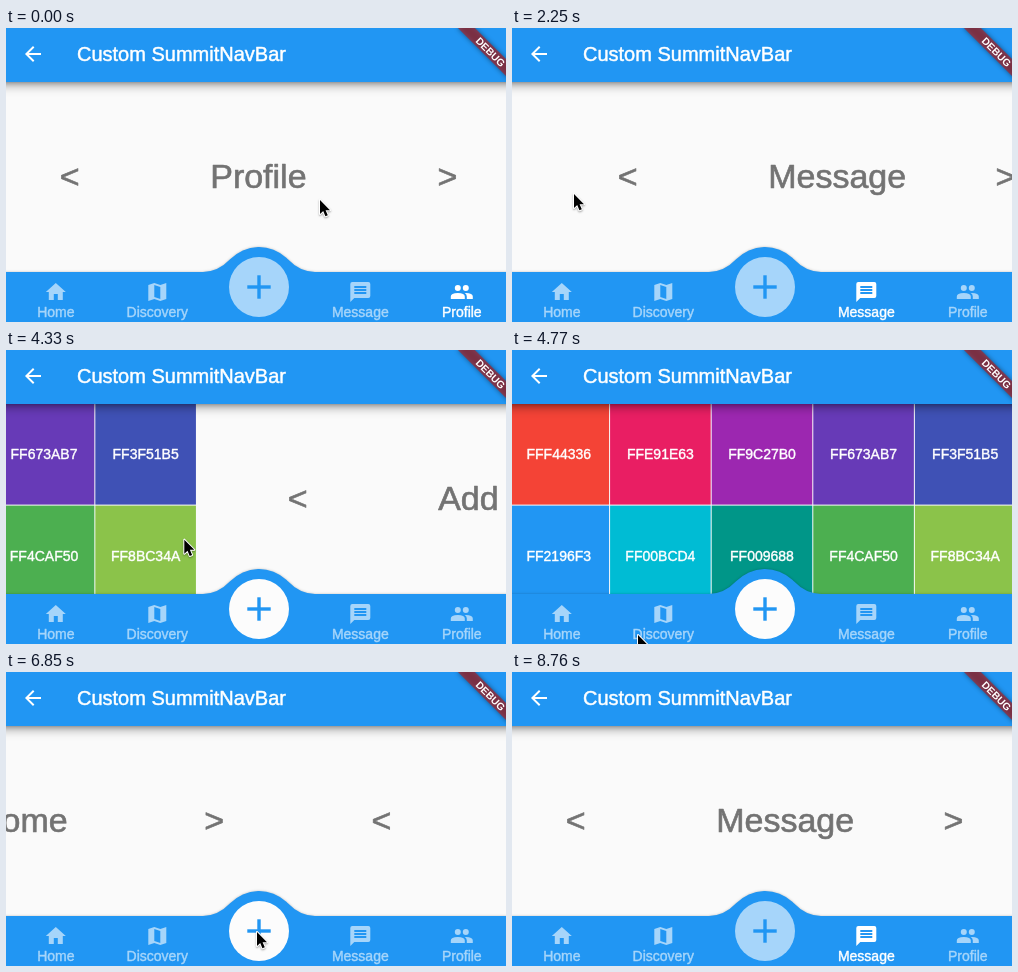
An HTML page with a canvas for the animation above (9.81 s loop, 500 by 294 pixels).

```html
<!DOCTYPE html>
<html lang="en">
<head>
<meta charset="utf-8">
<title>Tab bar demo</title>
<style>
  html, body { margin: 0; width: 100%; height: 100%; overflow: hidden; background: #fafafa; }
  canvas { display: block; width: 100%; height: 100%; }
</style>
</head>
<body>
<canvas id="stage"></canvas>
<script>
const W = 500, H = 294, PAGE = 507, LOOP = 9810;
const TICK = 148, FIRST_TICK = 465;
const BLUE = '#2196f3', PALE = '#a6d5fa', WHITE = '#fff', GRAY = '#737373';
const FONT = '"Liberation Sans", Arial, sans-serif';

const canvas = document.getElementById('stage');
const ctx = canvas.getContext('2d');
const ratio = window.devicePixelRatio || 1;
canvas.width = W * ratio;
canvas.height = H * ratio;

const HOME = 0, DISCOVERY = 1, ADD = 2, MESSAGE = 3, PROFILE = 4;
const NAMES = ['Home', 'Discovery', 'Add', 'Message', 'Profile'];
const SWATCHES = ['F44336', 'E91E63', '9C27B0', '673AB7', '3F51B5',
                  '2196F3', '00BCD4', '009688', '4CAF50', '8BC34A'];

const textLine = y => `M6 ${y}h12v2H6z`;
const head = x => `M${x + 3} 8a3 3 0 1 1-6 0 3 3 0 1 1 6 0z`;
const ICONS = {
  back: 'M20 11H7.8l5.6-5.6L12 4l-8 8 8 8 1.4-1.4L7.8 13H20z',
  [HOME]: 'M10 20v-6h4v6h5v-8h3L12 3 2 12h3v8z',
  [DISCOVERY]: 'M21 3L15 5.1 9 3 3 5v16l6-2.1 6 2.1 6-2zM15 19l-6-2.1V5l6 2.1z',
  [MESSAGE]: 'M4 2h16q2 0 2 2v12q0 2-2 2H6l-4 4V4q0-2 2-2z' + [6, 9, 12].map(textLine).join(''),
  [PROFILE]: [8, 16].map(head).join('') +
    'M8 13q-7 0-7 3.5V19h14v-2.5q0-3.5-7-3.5zM16 13h-1q2 1.2 2 3.5V19h6v-2.5q0-3.5-7-3.5z'
};
for (const key in ICONS) ICONS[key] = new Path2D(ICONS[key]);
const ARROW = new Path2D('M0 0V14L3.2 11 5.4 16.3 7.8 15.3 5.6 10.2H10z');

// Times are in ticks. A swipe drags the page by `held` px, then lets it settle.
const GESTURES = [
  { to: MESSAGE, start: 0, held: 6, release: 3 },
  { to: ADD, start: 10, held: 52, release: 13 },
  { to: DISCOVERY, start: 21, held: 79, release: 25 },
  { to: HOME, start: 35 },
  { to: ADD, start: 43 },
  { to: MESSAGE, start: 47, held: 76, release: 49 }
];
const SETTLE = 5;

// Pointer stops: arrive, leave, x, y.
const STOPS = [
  [-1, -1, 314, 172], [2, 3, 8, 165], [5, 7, 188, 161], [10, 10, 8, 166],
  [12, 13, 62, 166], [19, 21, 107, 172], [23, 25, 188, 172], [29, 29, 126, 285],
  [32, 37, 49, 272], [40, 44, 251, 260], [47, 47, 300, 194], [49, 49, 211, 196],
  [56, 56, 200, 312]
];

function tapShift(age) {
  const u = Math.min(1, 0.235 + age * TICK / 300);
  return PAGE * (1 - (1 - u) ** 2.3);
}

function swipeShift(g, tick) {
  const dragged = g.held * Math.min(1, (tick - g.start) / 2);
  const age = tick - g.release;
  if (age <= 0) return dragged;
  if (age >= SETTLE) return PAGE;
  return PAGE - (PAGE - g.held) * Math.exp(-0.3 * age * age);
}

function viewAt(tick) {
  const index = GESTURES.filter(g => g.start <= tick).length - 1;
  if (index < 0) return { from: PROFILE, to: MESSAGE, shift: 0, selected: PROFILE };
  const g = GESTURES[index];
  const from = index ? GESTURES[index - 1].to : PROFILE;
  const isSwipe = 'held' in g;
  const shift = isSwipe ? swipeShift(g, tick) : tapShift(tick - g.start);
  const selected = isSwipe && shift < PAGE ? from : g.to;
  return { from, to: g.to, shift, selected };
}

function pointerAt(tick) {
  const i = Math.max(0, STOPS.filter(stop => stop[0] <= tick).length - 1);
  const [, leave, x, y] = STOPS[i];
  if (tick <= leave || i === STOPS.length - 1) return [x, y];
  const [arrive, , nextX, nextY] = STOPS[i + 1];
  const u = (tick - leave) / (arrive - leave);
  const e = u * u * (3 - 2 * u);
  return [x + (nextX - x) * e, y + (nextY - y) * e];
}

function text(str, x, y, size, color, align = 'left', weight = '') {
  ctx.font = `${weight} ${size}px ${FONT}`;
  ctx.textAlign = align;
  ctx.fillStyle = ctx.strokeStyle = color;
  ctx.fillText(str, x, y);
  // A hairline gives the slightly heavier strokes of smoothed text.
  ctx.lineWidth = 0.25 + size * 0.012;
  ctx.lineJoin = 'round';
  if (!weight) ctx.strokeText(str, x, y);
}

function icon(name, x, y, color) {
  ctx.save();
  ctx.translate(x, y);
  ctx.fillStyle = color;
  ctx.fill(ICONS[name], 'evenodd');
  ctx.restore();
}

function withShadow(color, blur, dy, draw) {
  ctx.save();
  ctx.shadowColor = color;
  ctx.shadowBlur = blur * ratio;
  ctx.shadowOffsetY = dy * ratio;
  draw();
  ctx.restore();
}

function drawGrid(left) {
  const side = (PAGE - 4) / 5;
  SWATCHES.forEach((hex, i) => {
    const x = left + (i % 5) * (side + 1);
    const y = 54 + Math.floor(i / 5) * (side + 1);
    ctx.fillStyle = '#' + hex;
    ctx.fillRect(x, y, side, side);
    text('FF' + hex, x + side / 2, y + 55, 14, WHITE, 'center');
  });
}

function drawPage(id, left) {
  if (Math.abs(left) >= PAGE) return;
  if (id === DISCOVERY) return drawGrid(left);
  const inset = id === ADD ? 38 : 0;
  text('<', left + 53.8 + inset, 160, 34, GRAY);
  text(NAMES[id], left + 204.2 + inset, 160, 34, GRAY);
  text('>', left + 431.5 - inset, 160, 34, GRAY);
}

function drawTopBar() {
  for (let i = 0; i < 18; i++) {
    ctx.fillStyle = `rgba(0,0,0,${0.36 * (1 - i / 18) ** 3.2})`;
    ctx.fillRect(0, 54 + i, W, 1);
  }
  ctx.fillStyle = BLUE;
  ctx.fillRect(0, 0, W, 54);
  icon('back', 15, 14, WHITE);
  text('Custom SummitNavBar', 71, 33, 20, WHITE);
}

function barPath(cx, cy) {
  const r = 40, top = 244, angle = 0.763;
  const px = r * Math.cos(angle), py = r * Math.sin(angle);
  ctx.beginPath();
  ctx.moveTo(-20, top);
  ctx.lineTo(cx - 56, top);
  ctx.quadraticCurveTo(cx - 41, top, cx - px, cy - py);
  ctx.arc(cx, cy, r, Math.PI + angle, -angle);
  ctx.quadraticCurveTo(cx + 41, top, cx + 56, top);
  ctx.lineTo(W + 20, top);
  ctx.lineTo(W + 20, H + 20);
  ctx.lineTo(-20, H + 20);
  ctx.closePath();
}

function drawBottomBar(selected) {
  const cx = 253, cy = 259;
  ctx.fillStyle = BLUE;
  withShadow('rgba(0,0,0,.25)', 2.5, 0, () => { barPath(cx, cy); ctx.fill(); });

  ctx.fillStyle = selected === ADD ? '#fcfcfc' : PALE;
  ctx.beginPath();
  ctx.arc(cx, cy, 30, 0, Math.PI * 2);
  ctx.fill();
  ctx.fillStyle = BLUE;
  ctx.fillRect(cx - 11.7, cy - 1.7, 23.4, 3.4);
  ctx.fillRect(cx - 1.7, cy - 11.7, 3.4, 23.4);

  for (const id of [HOME, DISCOVERY, MESSAGE, PROFILE]) {
    const x = cx - 0.2 + (id - ADD) * 101.5;
    const color = id === selected ? WHITE : PALE;
    icon(id, x - 12, 252, color);
    text(NAMES[id], x, 289, 14, color, 'center');
  }
}

function drawBanner() {
  ctx.save();
  ctx.translate(PAGE + 1.5, 0);
  ctx.rotate(Math.PI / 4);
  // The strip that casts the shadow stands far off the stage.
  const far = 1000, shift = far * Math.SQRT1_2;
  ctx.save();
  ctx.shadowColor = 'rgba(0,0,0,.45)';
  ctx.shadowBlur = 5 * ratio;
  ctx.shadowOffsetX = -far * ratio;
  ctx.fillStyle = '#000';
  ctx.fillRect(-40 + shift, 28 - shift, 80, 12);
  ctx.restore();
  ctx.fillStyle = 'rgba(183,28,28,.63)';
  ctx.fillRect(-40, 28, 80, 12);
  text('DEBUG', 0, 37.6, 10.2, WHITE, 'center', 'bold');
  ctx.restore();
}

function drawPointer([x, y]) {
  ctx.save();
  ctx.translate(x, y);
  ctx.lineJoin = 'round';
  ctx.lineWidth = 2;
  ctx.strokeStyle = WHITE;
  withShadow('rgba(0,0,0,.35)', 2, 1, () => ctx.stroke(ARROW));
  ctx.fillStyle = '#000';
  ctx.fill(ARROW);
  ctx.restore();
}

function render(time) {
  const tick = Math.floor((time - FIRST_TICK) / TICK);
  const { from, to, shift, selected } = viewAt(tick);
  const side = Math.sign(to - from);

  ctx.setTransform(ratio, 0, 0, ratio, 0, 0);
  ctx.fillStyle = '#fafafa';
  ctx.fillRect(0, 0, W, H);
  drawPage(from, -side * shift);
  drawPage(to, side * (PAGE - shift));
  drawTopBar();
  drawBottomBar(selected);
  drawBanner();
  drawPointer(pointerAt(tick));
}

const start = performance.now();
function loop() {
  render((performance.now() - start) % LOOP);
  requestAnimationFrame(loop);
}
loop();
</script>
</body>
</html>
```
